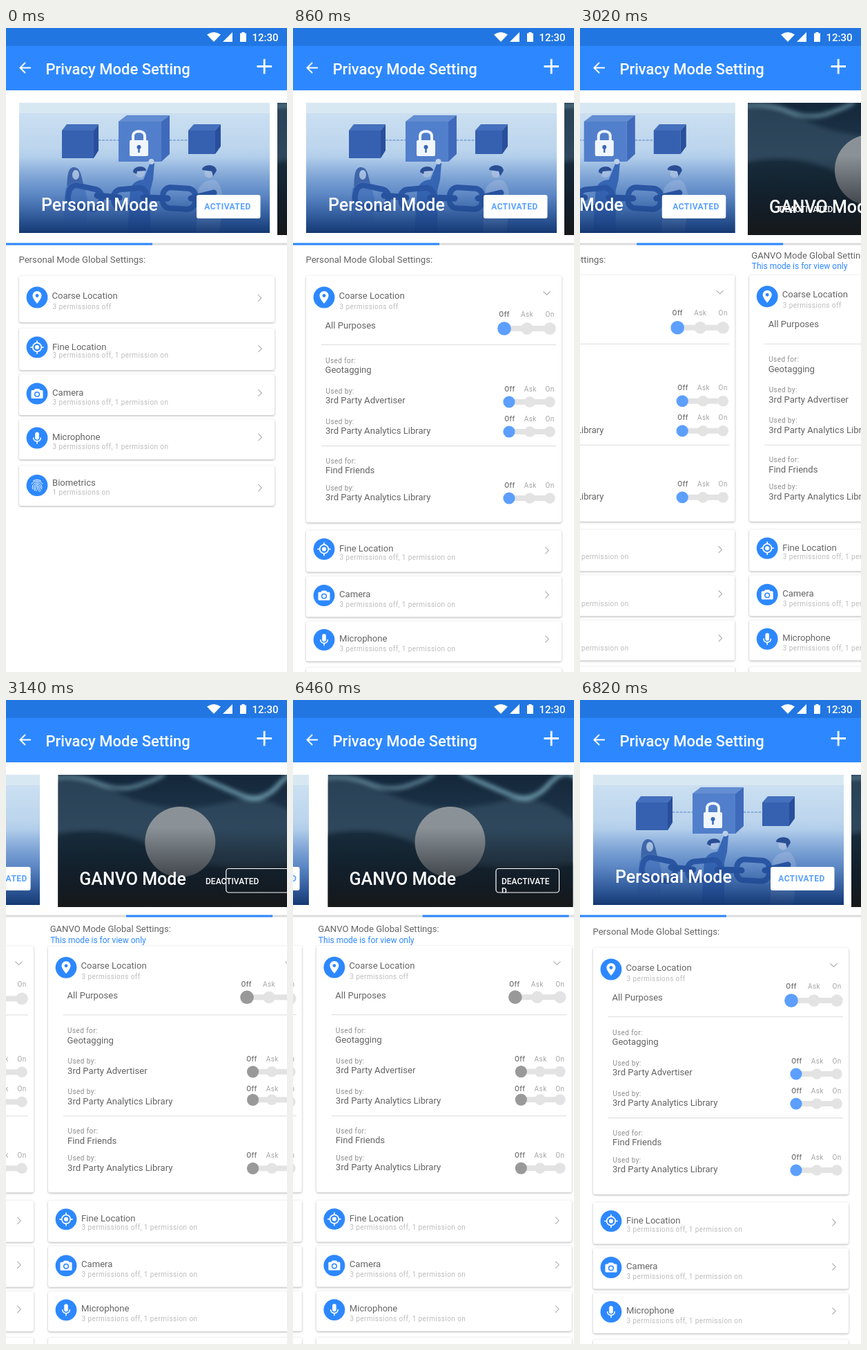
These frames come from a looping animation (407 by 930 pixels, 8 s). An HTML page:

```html
<!DOCTYPE html>
<html lang="en">
<head>
<meta charset="utf-8">
<title>Privacy Mode Setting</title>
<style>
  html, body { margin: 0; width: 100%; height: 100%; overflow: hidden; background: #fff; }
  svg { display: block; width: 100vw; height: 100vh; }
  text { font-family: Roboto, Arial, sans-serif; }
  .card { fill: #fff; filter: drop-shadow(0 1.4px 1.4px rgba(0, 0, 0, .3)); }
  .label { font-size: 13.1px; fill: #646464; }
  .small { font-size: 10px; letter-spacing: .42px; fill: #8c8c8c; }
  .sub { fill: #bcbcbc; }
  .pos { fill: #a6a6a6; text-anchor: middle; }
  .off { fill: #777; font-weight: 500; }
  .mode { font-size: 25px; font-weight: 500; fill: #fff; }
  .btn { font-size: 12px; font-weight: 500; fill: #fff; }
  .on { font-weight: 700; letter-spacing: .45px; fill: #5ba2ff; }
  .line { fill: none; stroke-linecap: round; stroke-linejoin: round; }
</style>
</head>
<body>
<svg id="stage" viewBox="0 0 407 930"></svg>
<script>
const BLUE = '#2d88ff';
const DROP = 291.5;

const text = (x, y, cls, s, more = '') => `<text x="${x}" y="${y}" class="${cls}" ${more}>${s}</text>`;
const rect = (x, y, w, h, fill, more = '') =>
  `<rect x="${x}" y="${y}" width="${w}" height="${h}" fill="${fill}" ${more}/>`;
const circle = (x, y, r, fill) => `<circle cx="${x}" cy="${y}" r="${r}" fill="${fill}"/>`;
const path = (d, fill, more = '') => `<path d="${d}" fill="${fill}" ${more}/>`;
const stroke = (d, color, w, more = '') =>
  `<path d="${d}" class="line" stroke="${color}" stroke-width="${w}" ${more}/>`;
const group = (id, body, more = '') => `<g id="${id}" ${more}>${body}</g>`;
const gradient = (id, stops) =>
  `<linearGradient id="${id}" x2="0" y2="1">${stops.map(([o, c, a = 1]) =>
    `<stop offset="${o}" stop-color="${c}" stop-opacity="${a}"/>`).join('')}</linearGradient>`;

// White glyphs drawn around the centre of a round icon
const glyphs = {
  pin: path('M0-9C-4-9-6.5-6-6.5-2.5C-6.5 2 0 9 0 9S6.5 2 6.5-2.5C6.5-6 4-9 0-9Z', '#fff') + circle(0, -2.5, 2.4, BLUE),
  target: `<circle r="6.3" class="line" stroke="#fff" stroke-width="1.7"/>` + circle(0, 0, 3.1, '#fff') +
    stroke('M0-9V-7M0 7V9M-9 0H-7M7 0H9', '#fff', 1.7),
  camera: path('M-3-7H3L4.5-5H7Q8.5-5 8.5-3.5V5.5Q8.5 7 7 7H-7Q-8.5 7-8.5 5.5V-3.5Q-8.5-5-7-5H-4.5Z', '#fff') +
    circle(0, 1, 4.1, BLUE) + circle(0, 1, 2.5, '#fff'),
  mic: rect(-2.8, -8.5, 5.6, 11, '#fff', 'rx="2.8"') +
    stroke('M-5.2 0C-5.2 6.5 5.2 6.5 5.2 0M0 5V8', '#fff', 1.6),
  print: stroke('M-5.5-6.5Q0-10 5.5-6.5M-8-2C-5-7.5 5-7.5 8-2M-6.5 5C-9-5 6-8 7 3' +
    'M-3.5 7.5C-8-3 4-5 4.5 2.5Q5 5 7 5M-1 8C-5 0 1-3 2 2Q3 7 5.5 7.5M0 1Q0 7 4 9', '#fff', 1)
};
const icon = (y, name) => `<g transform="translate(45 ${y})">${circle(0, 0, 15.4, BLUE)}${glyphs[name]}</g>`;
const chevron = more => stroke('M-2.3-4.7L2.3 0L-2.3 4.7', '#b4b4b4', 1.2, more);

const rows = [
  { top: 434, h: 60, icon: 461, name: 460, sub: 473, chev: 463, glyph: 'target', title: 'Fine Location', note: '3 permissions off, 1 permission on' },
  { top: 500, h: 59, icon: 528, name: 526, sub: 541, chev: 527, glyph: 'camera', title: 'Camera', note: '3 permissions off, 1 permission on' },
  { top: 565, h: 58, icon: 592, name: 590, sub: 605, chev: 591, glyph: 'mic', title: 'Microphone', note: '3 permissions off, 1 permission on' },
  { top: 632, h: 58, icon: 660.5, name: 656, sub: 671, chev: 664, glyph: 'print', title: 'Biometrics', note: '1 permissions on' }
];
const row = r =>
  rect(19, r.top, 370, r.h, '#fff', 'rx="3" class="card"') + icon(r.icon, r.glyph) +
  text(67, r.name + 4.6, 'label', r.title) + text(67.5, r.sub + 3.4, 'small sub', r.note) +
  chevron(`transform="translate(368 ${r.chev})"`);

// Three-way switch: labels at y, slider at sy
function toggle(y, sy, big, own) {
  const xs = big ? [306, 339, 372] : [313, 343, 372];
  const r = big ? 8.8 : 7.8;
  const knob = xs[0] + (own ? 0 : big ? 1 : 2.5);
  const names = ['Off', 'Ask', 'On'].map((s, i) =>
    text(xs[i] + (big || i === 2 ? 0 : .8), y + 3.5, i ? 'small pos' : 'small pos off', s)).join('');
  return names + rect(xs[0], sy - 4, xs[2] - xs[0], 8, '#e3e3e3') +
    circle(xs[1], sy, r, '#e3e3e3') + circle(xs[2], sy, r, '#e3e3e3') +
    circle(knob, sy, big ? 9.8 : 8.6, own ? '#5c9fff' : '#999');
}

function details(own) {
  const up = n => own ? 0 : n;
  const lines = [
    [47, 480, 'Used for:', 'Geotagging'], [47.5, 524, 'Used by:', '3rd Party Advertiser'],
    [47.5, 568, 'Used by:', '3rd Party Analytics Library'],
    [47.5, 625, 'Used for:', 'Find Friends'], [47.5, 664, 'Used by:', '3rd Party Analytics Library']
  ];
  return text(46.5, 433.5, 'label', 'All Purposes') +
    lines.map(([x, y, a, b]) => text(x, y + 3.5, 'small', a) + text(x - .5, y + 18.2, 'label', b)).join('') +
    rect(41, 457, 340, 1, '#dcdcdc') + rect(41, 603, 340, 1, '#dcdcdc') +
    toggle(413, 434 - up(2), true, own) + toggle(521, 540 - up(.5), false, own) +
    toggle(564, 583 - up(3), false, own) + toggle(660, 679, false, own);
}

const page = (id, own) => group(id,
  rect(19, 358, 370, 356, '#fff', `rx="3" class="card" id="${id}Card"`) + icon(389, 'pin') +
  text(66.5, 390.6, 'label', 'Coarse Location') + text(67.5, 405.7, 'small sub', '3 permissions off') +
  chevron(`id="${id}Chev" transform="translate(367.5 383) rotate(90)"`) +
  group(id + 'More', details(own)) +
  group(id + 'Rows', rows.map(row).join(''), `transform="translate(0 ${DROP})"`));

// Box with front face x,y,w,h and depth d
const cube = (x, y, w, h, d, front, top, side) =>
  path(`M${x} ${y}l${d}-9h${w}l${-d} 9Z`, top) +
  path(`M${x + w} ${y}l${d}-9v${h - 2}l${-d} 11Z`, side) + rect(x, y, w, h, front);

const link = (x, y, w, h, a) =>
  rect(x, y, w, h, 'none', `rx="11" stroke="#28519f" stroke-width="8" transform="rotate(${a} ${x + w / 2} ${y + h / 2})"`);

const ownBanner = group('bannerA', `<g clip-path="url(#clipA)">` +
  rect(19, 108, 363, 188, 'url(#sky)') + rect(19, 108, 363, 15, '#d8e8f3') +
  stroke('M134 162H163M237 162H265', '#4f7ec6', 1, 'stroke-dasharray="3 2.5"') +
  cube(81, 148, 46, 40, 7, '#3660b0', '#4470bd', '#294f9c') +
  cube(163, 135, 62, 58, 12, '#527fcb', '#638dd2', '#3f6abb') +
  cube(264, 148, 39, 34, 8, '#3660b0', '#4470bd', '#294f9c') +
  stroke('M184 163V156C184 147 201 147 201 156V163', '#f0f6fd', 4) +
  rect(179, 162, 27, 23, '#f0f6fd', 'rx="2"') + circle(192.5, 172, 3, '#3b67b4') + rect(191.3, 173, 2.4, 7, '#3b67b4') +
  path('M88 235C89 217 88 202 98 201C109 201 109 216 113 228L106 236Z', '#4468a8') +
  `<ellipse cx="101" cy="212" rx="5" ry="7" fill="#c3d5ec"/>` +
  path('M82 296L86 232Q98 217 113 226L119 252L114 296Z', '#5f8acb') +
  path('M176 296L180 233Q184 220 199 219L209 194L215 195L213 219L209 235V296Z', '#3a68b8') +
  circle(210.5, 193, 4, '#c3d5ec') + circle(194, 209, 7, '#c3d5ec') +
  path('M184 208C184 198 203 198 203 206L190 207L189 211Z', '#2a4b8f') +
  path('M275 296L279 232Q288 217 304 220Q314 229 314 252L309 296Z', '#b3cbeb') +
  circle(294, 210, 6.5, '#c3d5ec') + path('M284 205C284 197 304 195 305 206L300 214L298 207Z', '#2a4b8f') +
  link(90, 230, 48, 29, 12) + link(156, 232, 48, 27, -5) + link(227, 231, 47, 30, 3) +
  stroke('M132 242L164 245M199 245L234 246M268 246L301 238', '#234a97', 9) +
  rect(19, 108, 363, 188, 'url(#shadeA)') + '</g>' +
  text(51, 264, 'mode', 'Personal Mode') + rect(276, 241, 92.5, 34, '#fff', 'rx="3"') +
  text(287.3, 261.7, 'btn on', 'ACTIVATED', 'id="active"'));

const otherBanner = group('bannerB', `<g clip-path="url(#clipB)">` +
  rect(37, 108, 355, 191, 'url(#night)') +
  `<g filter="url(#soft)">` +
  path('M30 118Q72 108 110 128T190 154T290 146T400 182V300H30Z', '#3a5468', 'opacity=".6"') +
  path('M30 195Q110 175 180 215T400 235V300H30Z', '#152636', 'opacity=".8"') +
  stroke('M30 113Q65 107 96 120T155 123T190 108', '#8fc0d0', 4, 'opacity=".75"') +
  stroke('M230 106Q275 126 304 138T357 122T400 116', '#8cc3d4', 5, 'opacity=".85"') + '</g>' +
  circle(214, 205, 51, '#8b9297') +
  rect(37, 108, 355, 191, 'url(#shadeB)') + '</g>' +
  text(68, 267, 'mode', 'GANVO Mode') +
  rect(280.5, 243.5, 91.5, 34.5, 'none', 'rx="4" stroke="#fff" stroke-width="1.2"') +
  group('wrapped', text(288.5, 265.5, 'btn', 'DEACTIVATE') + text(288.5, 279.5, 'btn', 'D'), 'clip-path="url(#clipBtn)"'));

const header = rect(0, 0, 407, 26, '#2176e2') + rect(0, 26, 407, 64, BLUE) +
  path('M291 9.5Q301 2.5 311 9.5L301 20Z', '#fff') + path('M328 6V20H314Z', '#fff') +
  path('M339 7.5H341.5V6H345.5V7.5H348V20H339Z', '#fff') +
  `<text x="356.5" y="18.5" font-size="15" font-weight="500" fill="#fff">12:30</text>` +
  `<path d="M36 57.5H21M28 50L20.5 57.5L28 65" fill="none" stroke="#fff" stroke-width="2"/>` +
  `<path d="M363.5 55.5H385M374.2 44.8V66.2" fill="none" stroke="#fff" stroke-width="2.8"/>` +
  `<text x="57.4" y="67" font-size="22" font-weight="500" fill="#fff">Privacy Mode Setting</text>`;

const defs = `<defs>` +
  gradient('sky', [[0, '#cfe2f2'], [.35, '#bcd5ed'], [.65, '#8eb3e0'], [1, '#5b89c8']]) +
  gradient('shadeA', [[.42, '#2c5fae', 0], [.7, '#2c5ca8', .45], [1, '#12356f', .96]]) +
  gradient('night', [[0, '#14273b'], [.45, '#22394d'], [1, '#13202a']]) +
  gradient('shadeB', [[.4, '#0a1016', 0], [.8, '#10151b', .65], [1, '#171717', .95]]) +
  `<filter id="soft"><feGaussianBlur stdDeviation="3"/></filter>` +
  `<clipPath id="clipA">${rect(19, 108, 363, 188, '#000')}</clipPath>` +
  `<clipPath id="clipB">${rect(37, 108, 355, 191, '#000')}</clipPath>` +
  `<clipPath id="clipBtn">${rect(280, 244, 93, 34.5, '#000')}</clipPath></defs>`;

document.getElementById('stage').innerHTML = defs + rect(0, 0, 407, 930, '#fff') +
  page('pageA', true) + page('pageB', false) +
  group('headA', text(18.4, 339.3, 'label', 'Personal Mode Global Settings:', 'style="font-size:13.2px"')) +
  group('headB', text(21.5, 335.7, 'label', 'GANVO Mode Global Settings:') +
    `<text x="22" y="351.2" font-size="12" fill="${BLUE}">This mode is for view only</text>`) +
  ownBanner + otherBanner + text(289, 265.8, 'btn', 'DEACTIVATED', 'id="loose"') +
  rect(0, 310.5, 407, 3, '#dcdcdc') + rect(0, 310.5, 212, 3, BLUE, 'id="tab"') + header;

const el = {};
document.querySelectorAll('[id]').forEach(e => el[e.id] = e);
const move = (id, x, y = 0) => el[id].setAttribute('transform', `translate(${x} ${y})`);
const show = (id, on) => el[id].setAttribute('visibility', on ? 'visible' : 'hidden');

// cubic-bezier(.4, 0, .2, 1)
function ease(u) {
  if (u >= 1) return 1;
  let lo = 0, hi = 1;
  for (let i = 0; i < 24; i++) {
    const s = (lo + hi) / 2, q = 1 - s;
    if (1.2 * q * q * s + .6 * q * s * s + s * s * s < u) lo = s; else hi = s;
  }
  return lo * lo * (3 - 2 * lo);
}

// Progress of a transition that advances every 40 ms
const ramp = (t, from) => t < from ? 0 : ease((Math.floor((t - from) / 40) * 40 + 47) / 397);

function draw(t) {
  const open = ramp(t, 500);
  const back = t >= 6460;
  const p = back ? 1 - ramp(t, 6460) : ramp(t, 2940);

  el.pageACard.setAttribute('height', 67 + 289 * open);
  el.pageAMore.setAttribute('opacity', open);
  move('pageARows', 0, DROP * open);
  el.pageAChev.setAttribute('transform', `translate(367.5 ${390 - 7 * open}) rotate(${90 * open})`);

  move('pageA', -391 * p, -3 * p);
  move('pageB', 391 * (1 - p), -3 * p);
  move('headA', -391 * p);
  move('headB', 392 * (1 - p), -5 * (1 - p));
  move('bannerA', -373 * p);
  move('active', 10 * p);
  move('bannerB', 356 * (1 - p));
  el.tab.setAttribute('x', 195 * p);
  show('wrapped', back);
  show('loose', !back && p > 0);
}

const start = performance.now();
function tick() {
  draw((performance.now() - start) % 8000);
  requestAnimationFrame(tick);
}
draw(0);
requestAnimationFrame(tick);
</script>
</body>
</html>
```
